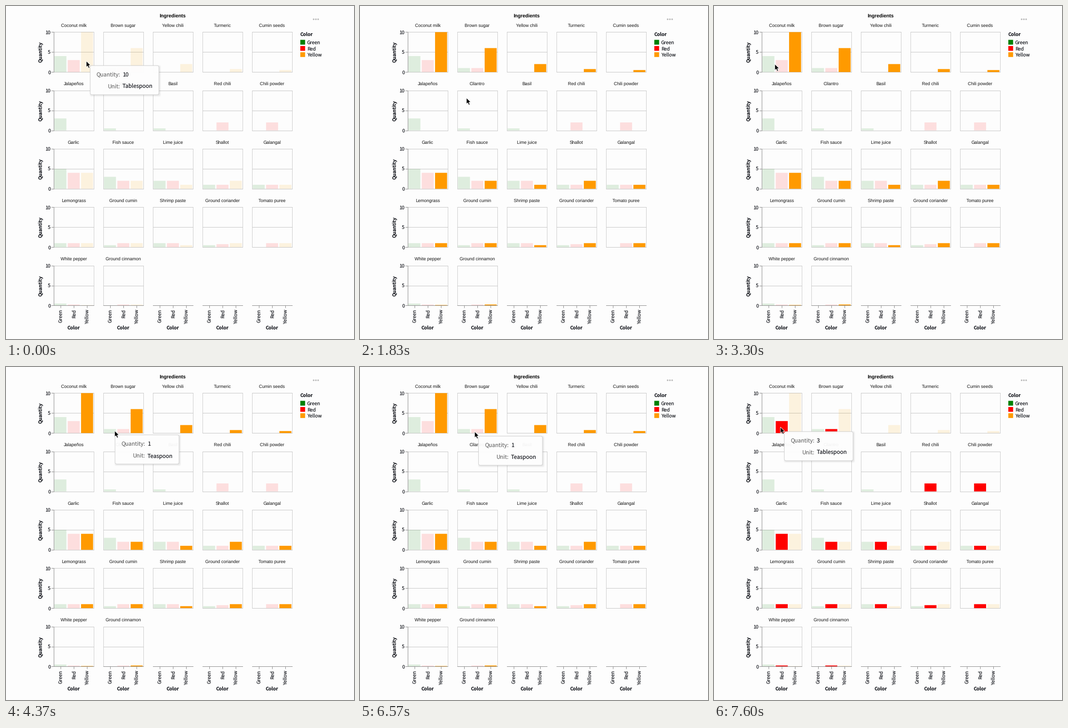
Recreate the animation shown at these times as a matplotlib script. Size 765 by 732 pixels, loop 8 s.

```python
import matplotlib.pyplot as plt
import numpy as np
from matplotlib.animation import FuncAnimation
from matplotlib.collections import LineCollection, PolyCollection
from matplotlib.patches import Circle, FancyBboxPatch, Polygon, Rectangle

plt.rcParams["text.hinting"] = "none"

W, H, DPI = 765, 732, 96
PT = 72 / DPI
INTERVAL, LOOP = 25, 8000
SANS, UI = "Liberation Sans", "Noto Sans CJK JP"
INK = "#1c1e24"

# Panel grid
LEFT, TOP, STEP_X, STEP_Y = 104.9, 57.4, 109, 128.3
PW, PH = 88, 87.8
BAND = PW / 3
BAR = BAND * 0.9

# Selected and faded bar colours
COLORS = {"Green": ("#008000", "#008000"), "Red": ("#ff0000", "#ff0000"),
          "Yellow": ("#ff9a00", "#f5a500")}
DIM = 0.12


def mixed(name, green=1, red=1, yellow=1):
    return name, (green, red, yellow)


def pure(name, green=0, red=0, yellow=0):
    return name, (green, red, yellow)


INGREDIENTS = [
    mixed("Coconut milk", 4, 3, 10),
    mixed("Brown sugar", yellow=6),
    pure("Yellow chili", yellow=2),
    pure("Turmeric", yellow=0.75),
    pure("Cumin seeds", yellow=0.5),
    pure("Jalapeños", green=3),
    pure("Cilantro", green=0.5),
    pure("Basil", green=0.5),
    pure("Red chili", red=2),
    pure("Chili powder", red=2),
    mixed("Garlic", 5, 4, 4),
    mixed("Fish sauce", 3, 2, 2),
    mixed("Lime juice", 2, 2),
    mixed("Shallot", yellow=2),
    mixed("Galangal"),
    mixed("Lemongrass"),
    mixed("Ground cumin", green=0.5),
    mixed("Shrimp paste", yellow=0.5),
    mixed("Ground coriander", green=0.5, red=0.75),
    mixed("Tomato puree", green=0),
    mixed("White pepper", 0.5, 0.25, 0.12),
    mixed("Ground cinnamon", 0.06, 0.25, 0.25),
]

# Pointer moves: start ms, end ms, destination
START = (176.5, 121)
MOVES = [
    (30, 130, (174, 126)),
    (1450, 1840, (234, 202)),
    (1850, 2270, (160, 141)),
    (2290, 2530, (147, 131)),
    (3110, 3520, (120, 124.5)),
    (4220, 4397, (252, 142)),
    (4480, 4900, (228.3, 144.5)),
    (5140, 5270, (228, 143)),
    (5490, 5880, (252, 142)),
    (6570, 7170, (146, 132)),
]
CLICKS = [(830, "Yellow"), (7600, "Red")]
LAG = 10

fig = plt.figure(figsize=(W / DPI, H / DPI), dpi=DPI, facecolor="#fdfdfd")
ax = fig.add_axes([0, 0, 1, 1])
ax.set(xlim=(0, W), ylim=(H, 0))
ax.axis("off")


def label(x, y, s, size=10.5, font=UI, ha="center", color=INK, **kw):
    return ax.text(x, y, s, fontsize=size * PT, family=font, ha=ha,
                   va="baseline", color=color, rotation_mode="anchor", **kw)


def lines(segments, color, z):
    """One-pixel lines, centred on whole pixels."""
    crisp = np.floor(np.array(segments) + 0.5) + 0.5
    ax.add_collection(LineCollection(crisp, colors=color, zorder=z, snap=False,
                                     linewidths=PT, capstyle="projecting"))


def hline(x0, x1, y):
    return [(x0, y), (x1, y)]


def vline(x, y0, y1):
    return [(x, y0), (x, y1)]


def origin(n):
    return LEFT + STEP_X * (n % 5), TOP + STEP_Y * (n // 5)


def bar_box(n, k, value):
    x, y = origin(n)
    left = x + BAND * (k + 0.05)
    return left, y + PH * (1 - value / 10), left + BAR, y + PH


def draw_panels():
    borders, grid = [], []
    for n, (name, _) in enumerate(INGREDIENTS):
        x, y = origin(n)
        borders += [vline(x, y, y + PH), vline(x + PW, y, y + PH)]
        grid += [hline(x, x + PW, y + PH * f) for f in (0, 0.5, 1)]
        label(x + PW / 2 - 0.2, y - 11.4, name, 9.8, SANS, color="#111111")
    lines(borders, "#cccccc", 1)
    lines(grid, "#c4c4c4", 1)


def draw_axes():
    segments = []
    for r in range(5):
        y = TOP + STEP_Y * r
        segments.append(vline(LEFT, y, y + PH))
        for value in (0, 5, 10):
            tick = y + PH * (1 - value / 10)
            segments.append(hline(LEFT - 5, LEFT, tick))
            label(LEFT - 6.8, tick + 4.3, value, ha="right")
        label(80, y + PH / 2 + 0.3, "Quantity", rotation=90, weight="bold")
    base = TOP + STEP_Y * 4 + PH
    for c in range(5):
        x = LEFT + STEP_X * c
        segments.append(hline(x, x + PW, base))
        for k, s in enumerate(COLORS):
            mid = x + BAND * (k + 0.5)
            segments.append(vline(mid, base, base + 5))
            label(mid + 4.1, 666.5, s, ha="right", rotation=90)
        label(x + PW / 2, 710.5, "Color", weight="bold")
    lines(segments, "#888888", 3)


def draw_legend():
    label(646.5, 66.3, "Color", ha="left", weight="bold")
    for k, (name, (color, _)) in enumerate(COLORS.items()):
        y = 74.4 + 13.6 * k
        ax.add_patch(Rectangle((647, y), 10.5, 10.5, fc=color, lw=0,
                               snap=False))
        label(662, y + 9.4, name, ha="left")
    for k in range(3):
        ax.add_patch(Circle((676.3 + 4.9 * k, 29.2), 1.8, fc="#bdbdbd", lw=0))


def draw_bars():
    groups = {}
    for k, name in enumerate(COLORS):
        polys = []
        for n, (_, values) in enumerate(INGREDIENTS):
            if values[k]:
                x0, y0, x1, y1 = bar_box(n, k, values[k])
                polys.append([(x0, y0), (x1, y0), (x1, y1), (x0, y1)])
        groups[name] = PolyCollection(polys, linewidths=0, zorder=2,
                                      snap=False)
        ax.add_collection(groups[name])
    return groups


class Tooltip:
    HEIGHT = 64
    WIDTHS = {"Tablespoon": 151, "Teaspoon": 140.5}

    def __init__(self):
        self.shadows = [self.box(10, fc="black", alpha=0.022, lw=0)
                        for _ in range(4)]
        self.body = self.box(11, fc=(1, 1, 1, 0.95), ec="#cfcfcf", lw=PT)
        grey = dict(ha="right", color="#757575", size=12.1, zorder=12)
        dark = dict(ha="left", size=12.1, zorder=12)
        self.rows = [
            (label(0, 0, "Quantity:", **grey), label(0, 0, "", **dark), 24),
            (label(0, 0, "Unit:", **grey), label(0, 0, "", **dark), 49.5),
        ]
        self.parts = [*self.shadows, self.body,
                      *(t for row in self.rows for t in row[:2])]

    @staticmethod
    def box(z, **kw):
        return ax.add_patch(FancyBboxPatch(
            (0, 0), 10, 10, boxstyle="round,pad=0,rounding_size=4",
            zorder=z, **kw))

    def show(self, x, y, hit):
        for part in self.parts:
            part.set_visible(hit is not None)
        if hit is None:
            return
        value, unit = hit
        w = self.WIDTHS[unit]
        for grow, shadow in enumerate(self.shadows):
            shadow.set_bounds(x + 1.5 - grow, y + 1.5 - grow,
                              w + 2 * grow, self.HEIGHT + 2 * grow)
        self.body.set_bounds(x, y, w, self.HEIGHT)
        for (key, val, dy), s in zip(self.rows, (f"{value:g}", unit)):
            key.set_position((x + 66.3, y + dy))
            val.set_position((x + 71, y + dy))
            val.set_text(s)


def pointer_at(t):
    pos = np.array(START, float)
    for begin, end, goal in MOVES:
        u = np.clip((t - begin) / (end - begin), 0, 1)
        pos += (goal - pos) * u * u * (3 - 2 * u)
    return pos


def hit_test(x, y):
    for n, (_, values) in enumerate(INGREDIENTS):
        for k, value in enumerate(values):
            x0, y0, x1, y1 = bar_box(n, k, value)
            if value and x0 <= x <= x1 and y0 <= y <= y1:
                return value, "Teaspoon" if n else "Tablespoon"
    return None


label(366.3, 25.3, "Ingredients", 10.75, SANS, weight="bold", color="black")
draw_panels()
draw_axes()
draw_legend()
bars = draw_bars()
tooltip = Tooltip()
ARROW = np.array([(0, 0), (0, 13.4), (3, 10.7), (5.2, 15.6), (7.6, 14.6),
                  (5.5, 9.7), (9.6, 9.5)])
cursor = ax.add_patch(Polygon(ARROW, fc="black", ec="white", lw=0.9 * PT,
                              zorder=20))


def update(i):
    t = (i + 0.5) * INTERVAL
    chosen = None
    for when, name in CLICKS:
        if t >= when:
            chosen = name
    for name, group in bars.items():
        solid, faded = COLORS[name]
        group.set_facecolor(solid if name == chosen else faded)
        group.set_alpha(1 if name == chosen else DIM)
    pos = pointer_at(t)
    cursor.set_xy(ARROW + pos)
    x, y = pointer_at(t - LAG)
    tooltip.show(x + 8.6, y + 10, hit_test(*pos))
    return [cursor, *bars.values(), *tooltip.parts]


anim = FuncAnimation(fig, update, frames=LOOP // INTERVAL, interval=INTERVAL,
                     repeat=True, repeat_delay=0, blit=False)
plt.show()
```
